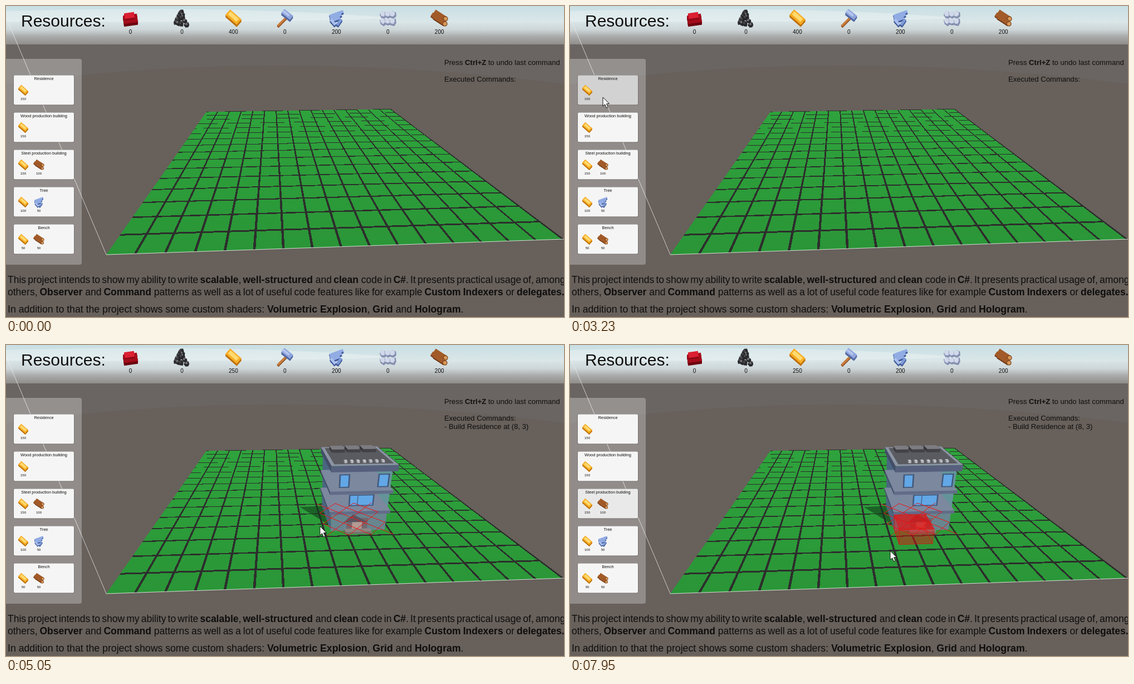
An HTML page with a canvas for the animation above (8000 ms loop, 1002 by 559 pixels).

```html
<!DOCTYPE html>
<html lang="en">
<head>
<meta charset="utf-8">
<title>Grid builder</title>
<style>
  html, body { margin: 0; width: 100%; height: 100%; overflow: hidden; background: #67605b; }
  canvas { display: block; }
</style>
</head>
<body>
<canvas id="stage" width="1002" height="559"></canvas>
<script>
const W = 1002, H = 559, LOOP = 8000, CELLS = 16, FILL = .91;
const FONT = '"Liberation Sans", Arial, sans-serif';
const stage = document.getElementById('stage').getContext('2d');
const backdrop = document.createElement('canvas');
backdrop.width = W;
backdrop.height = H;
let ctx = backdrop.getContext('2d');

const random = n => Math.abs(Math.sin(n * 12.9898) * 43758.5453) % 1;

// Ground cell (i, j) and height h, where 1 is the residence wall, to screen.
function project(i, j, h = 0) {
  const u = i / CELLS, v = j / CELLS;
  const w = 1 + .0653 * u + 1.5447 * v - .1455 * h;
  return [(180 + 887.4 * u + 736.1 * v - 80 * h) / w, (447 - .6 * u + 36.5 * v - 186 * h) / w];
}

// Screen to ground cell.
function toCell(x, y) {
  const a = 887.4 - .0653 * x, b = 736.1 - 1.5447 * x, p = x - 180;
  const c = -.6 - .0653 * y, d = 36.5 - 1.5447 * y, q = y - 447;
  const det = a * d - b * c;
  return [(p * d - b * q) / det * CELLS, (a * q - p * c) / det * CELLS];
}

const onGround = cell => cell.every(c => c >= 0 && c < CELLS);

function trace(points) {
  ctx.beginPath();
  points.forEach(p => ctx.lineTo(p[0], p[1]));
}

function poly(points, fill, stroke) {
  trace(points);
  ctx.closePath();
  if (fill) { ctx.fillStyle = fill; ctx.fill(); }
  if (stroke) { ctx.strokeStyle = stroke; ctx.lineWidth = 1; ctx.stroke(); }
}

function line(a, b, color) {
  trace([a, b]);
  ctx.strokeStyle = color;
  ctx.lineWidth = 1;
  ctx.stroke();
}

function roundRect(x, y, w, h, r, fill) {
  ctx.beginPath();
  ctx.roundRect(x, y, w, h, r);
  ctx.fillStyle = fill;
  ctx.fill();
}

function text(str, x, y, size, align = 'left', bold = false) {
  ctx.font = `${bold ? 'bold ' : ''}${size}px ${FONT}`;
  ctx.textAlign = align;
  ctx.fillStyle = '#0f0e0d';
  ctx.fillText(str, x, y);
  return ctx.measureText(str).width;
}

// Stars switch bold on and off; a right edge justifies the line.
function richText(str, x, y, size, right) {
  const parts = str.split('*');
  if (right) {
    const natural = parts.reduce((sum, part, k) => {
      ctx.font = `${k % 2 ? 'bold ' : ''}${size}px ${FONT}`;
      return sum + ctx.measureText(part).width;
    }, 0);
    ctx.wordSpacing = (right - x - natural) / (str.split(' ').length - 1) + 'px';
  }
  parts.forEach((part, k) => { x += text(part, x, y, size, 'left', k % 2 === 1); });
  ctx.wordSpacing = '0px';
}

// A bar turned by some degrees, with its thickness below it.
function bar(x, y, length, width, depth, degrees, top, side) {
  const angle = degrees * Math.PI / 180;
  const along = [Math.cos(angle) * length / 2, Math.sin(angle) * length / 2];
  const across = [-Math.sin(angle) * width / 2, Math.cos(angle) * width / 2];
  const corners = [[1, 1], [1, -1], [-1, -1], [-1, 1]]
    .map(([a, b]) => [x + a * along[0] + b * across[0], y + a * along[1] + b * across[1]]);
  for (let d = depth; d >= 0; d--) poly(corners.map(p => [p[0], p[1] + d]), d ? side : top);
}

function disc(x, y, r, fill) {
  ctx.beginPath();
  ctx.arc(x, y, r, 0, 2 * Math.PI);
  ctx.fillStyle = fill;
  ctx.fill();
}

function rock(x, y, r, seed, fill) {
  const corner = k => {
    const angle = k * Math.PI / 3 + random(seed), reach = r * (.75 + .4 * random(seed + k));
    return [x + reach * Math.cos(angle), y + reach * Math.sin(angle)];
  };
  poly([0, 1, 2, 3, 4, 5].map(corner), fill);
}

const ICONS = {
  ruby() {
    bar(0, 1, 25, 15, 5, -8, '#a50c1b', '#6d0510');
    bar(-2, -5, 18, 10, 3, -8, '#dc1f32', '#8d0916');
  },
  coal() {
    for (let k = 0; k < 14; k++) {
      const y = -11 + 1.8 * k, spread = 4 + .6 * k;
      const x = (random(k + 3) - .5) * 2 * spread - 1;
      rock(x, y, 5.5, k, '#28282b');
      rock(x - 1, y - 2, 2.4, k + 5, k % 2 ? '#707075' : '#47474b');
    }
  },
  gold() {
    bar(0, -2, 27, 13, 4, 41, '#f7ad25', '#bd7009');
    bar(0, -3, 20, 7, 0, 41, '#ffda70');
  },
  hammer() {
    bar(-4, 5, 25, 4, 2, -45, '#c87d3c', '#8a4a1c');
    bar(4, -7, 20, 9, 4, 38, '#8fa5dc', '#5369a0');
    bar(2, -9, 14, 4, 0, 38, '#b6c6ee');
  },
  steel() {
    for (let k = 0; k < 3; k++) bar(-k, -8 + 5 * k, 26 - 4 * k, 5, 3, -20, '#92ace4', '#3b5695');
    bar(-6, 7, 13, 5, 3, 50, '#a9bfee', '#3b5695');
    bar(5, 7, 13, 5, 3, -55, '#7f9bd8', '#3b5695');
  },
  stone() {
    for (let k = 0; k < 6; k++) {
      const x = -8 + 8.5 * (k % 3), y = k < 3 ? -7 : 6;
      rock(x, y + 1, 7.5, k + 2, '#8690b0');
      rock(x - 1, y - 1, 5.5, k + 2, '#d0d8ea');
    }
  },
  wood() {
    for (const [x, y] of [[2, -5], [-3, 0], [1, 4]]) {
      bar(x - 1, y - 1, 23, 8, 2, 33, '#a25b28', '#662f10');
      disc(x + 9, y + 6, 4.5, '#7a3e17');
      disc(x + 9, y + 6, 3.3, '#d6995a');
    }
  }
};

function icon(name, x, y, scale = 1) {
  ctx.save();
  ctx.translate(x, y);
  ctx.scale(scale, scale);
  ICONS[name]();
  ctx.restore();
}

const BUTTONS = [
  ['Residence', ['gold', 150]],
  ['Wood production building', ['gold', 150]],
  ['Steel production building', ['gold', 150], ['wood', 100]],
  ['Tree', ['gold', 100], ['steel', 50]],
  ['Bench', ['gold', 50], ['wood', 50]]
];
const RESOURCES = { ruby: 0, coal: 0, gold: 400, hammer: 0, steel: 200, stone: 0, wood: 200 };
const buttonTop = k => 124 + 67.1 * k;
const resourceX = k => 223.5 + 92.45 * k;

// Point sampling leaves the far lines broken.
function paintGround() {
  const image = ctx.getImageData(0, 0, W, H);
  for (let y = 184; y < 449; y++) {
    const k = (y - 184) / 264;
    for (let x = 178; x < W; x++) {
      const cell = toCell(x + .5, y + .5);
      if (!onGround(cell)) continue;
      const dark = cell.some(c => c % 1 > FILL);
      image.data.set(dark ? [45, 46, 44, 255] : [46 - 4 * k, 163 - 14 * k, 60 - 5 * k, 255], (y * W + x) * 4);
    }
  }
  ctx.putImageData(image, 0, 0);
}

function paintHeader() {
  const sky = ctx.createLinearGradient(0, 0, 0, 69);
  sky.addColorStop(0, '#c8dfe4');
  sky.addColorStop(.4, '#dae6e8');
  sky.addColorStop(.62, '#cdd5d7');
  sky.addColorStop(.8, '#a9aaaa');
  sky.addColorStop(1, '#918e8b');
  ctx.fillStyle = sky;
  ctx.fillRect(0, 0, W, 69);
  ctx.fillStyle = 'rgba(240,246,246,.4)';
  ctx.beginPath();
  ctx.moveTo(0, 9);
  ctx.quadraticCurveTo(420, -2, 700, 22);
  ctx.quadraticCurveTo(500, 30, 0, 28);
  ctx.fill();
}

function paintBackdrop() {
  ctx.fillStyle = '#6a6562';
  ctx.fillRect(0, 0, W, H);
  ctx.fillStyle = '#67605b';
  ctx.beginPath();
  ctx.moveTo(0, 140);
  ctx.quadraticCurveTo(480, 74, W, 140);
  ctx.lineTo(W, H);
  ctx.lineTo(0, H);
  ctx.fill();
  paintGround();
  paintHeader();
  line([0, 20], [180, 447], 'rgba(235,235,235,.75)');
  line([180, 447], [W, 419], 'rgba(235,240,235,.85)');
  roundRect(-4, 95, 140, 370, 4, 'rgba(255,255,255,.28)');

  text('Resources:', 27, 37, 30);
  Object.keys(RESOURCES).forEach((name, k) => icon(name, resourceX(k), 22));
  richText('Press *Ctrl+Z* to undo last command', 787, 106, 13.1);
  text('Executed Commands:', 787, 136, 13.1);
  richText('This project intends to show my ability to write *scalable*, *well-structured* and *clean* code in *C#*. ' +
    'It presents practical usage of, among', 3, 498, 17.5, 1001);
  richText('others, *Observer* and *Command* patterns as well as a lot of useful code features like for example ' +
    '*Custom Indexers* or *delegates.*', 3, 520, 17.5, 1000);
  richText('In addition to that the project shows some custom shaders: ' +
    '*Volumetric Explosion*, *Grid* and *Hologram*.', 3, 551, 17.7);
}

// A box on the ground; the camera sees its front, left side and top.
function box([i0, i1], [j0, j1], [h0, h1], front, left, top, stroke) {
  const quad = (fill, ...corners) => fill && poly(corners.map(c => project(...c)), fill, stroke);
  quad(left, [i0, j0, h0], [i0, j1, h0], [i0, j1, h1], [i0, j0, h1]);
  quad(front, [i0, j0, h0], [i1, j0, h0], [i1, j0, h1], [i0, j0, h1]);
  quad(top, [i0, j0, h1], [i1, j0, h1], [i1, j1, h1], [i0, j1, h1]);
}

const WALL = [[.24, 2.74], [.36, 2.76]], LEDGE = [[.14, 2.84], [.26, 2.76]], ROOF = [[.15, 2.9], [.2, 2.8]];
const STEPS = [[.85, 2.05], [.08, .36]];
const FLOORS = [0, .32, .64];

// Binds box() to a building standing at cell (i, j).
const blockAt = (i, j) => ([is, js], hs, ...colors) => box(is.map(a => a + i), js.map(b => b + j), hs, ...colors);

function shadow(i, j, fill) {
  poly([project(i - .95, j + 2.7), project(i + .24, j + 2.76), project(i + .24, j + .9)], fill);
}

function residence(i, j) {
  const block = blockAt(i, j);
  const pane = (a, b, h0, h1, fill) => block([[a, b], [.34, .34]], [h0, h1], fill);
  const glass = (a, b, h0, h1) => {
    pane(a, b, h0, h1, '#40587a');
    pane(a + .06, b - .06, h0 + .015, h1 - .015, '#62a7e6');
  };
  shadow(i, j, 'rgba(15,60,25,.6)');
  for (const h of FLOORS) {
    block(WALL, [h, h + .32], h ? '#64949a' : '#67868f', '#4a6680');
    if (h) block(LEDGE, [h - .02, h + .03], '#626c88', '#47516d', '#7c889e');
  }
  glass(.52, .97, .71, .91);
  glass(2.15, 2.64, .71, .91);
  glass(.98, 2.08, .42, .6);
  pane(1.35, 1.38, .43, .59, '#40587a');

  pane(.95, 1.9, 0, .22, '#74676d');
  pane(1.2, 1.65, .02, .18, '#b39a92');
  poly([project(i + .8, j + .3, .16), project(i + 1.2, j + .3, .29), project(i + 1.9, j + .3, .16)], '#5a5560');
  block(STEPS, [0, .035], '#77706f', '#5c5658', '#8d8583');

  block(ROOF, [.96, 1.05], '#56607d', '#434d68', '#8b94a3');
  block([[.3, 2.76], [.38, 2.66]], [1.05, 1.05], null, null, '#5a5b60');
  for (let k = 0; k < 3; k++) {
    block([[.5 + .72 * k, 1.1 + .72 * k], [1.9, 2.5]], [1.05, 1.1], '#434347', '#38383c', '#7c7c81');
  }
  for (let a = .75; a < 2.4; a += .26) {
    block([[a, a + .11], [.5, .65]], [1.05, 1.08], '#b8bcc2', '#80848c', '#cdd0d4');
  }

  for (let a = i; a < i + 3; a++) {
    for (let b = j; b < j + 3; b++) {
      line(project(a, b), project(a + 1, b + 1), '#f01414');
      line(project(a + 1, b), project(a, b + 1), '#f01414');
    }
  }
}

function residenceGhost(i, j) {
  const block = blockAt(i, j), glow = a => `rgba(10,255,35,${a})`;
  shadow(i, j, 'rgba(15,80,25,.45)');
  block(WALL, [0, .96], glow(.2), glow(.22), null, glow(.5));
  for (const h of FLOORS) {
    block(LEDGE, [h, h + .05], glow(.25), glow(.25), glow(.12), glow(.55));
    line(project(i + 2.74, j + .36, h + .3), project(i + 2.74, j + 2.76, h + .3), glow(.6));
  }
  block([[1.1, 1.9], [.3, .36]], [0, .2], glow(.25), null, null, glow(.4));
  block([[.95, 2.05], [.3, .34]], [.2, .25], glow(.6));
  block(STEPS, [0, .04], glow(.5), glow(.5), glow(.3), glow(.6));
  block(ROOF, [.98, 1.05], glow(.7), glow(.6), glow(.88), glow(.8));
}

function workshopGhost(i, j) {
  const blocked = i < SITE[0] + 3 && i + 2 > SITE[0] && j < SITE[1] + 3 && j + 2 > SITE[1];
  const tint = a => `rgba(${blocked ? '225,18,18' : '10,250,30'},${a})`;
  const is = [i + .24, i + 1.68], js = [j + .35, j + 1.58];
  box(is, js, [0, 0], null, null, tint(.15), tint(.35));
  box(is, js, [0, .24], tint(.38), tint(.45), tint(.75), tint(.5));
  line(project(is[1], js[1], .24), project(is[1], js[1]), tint(.6));
  line(project(is[1], js[1]), project(is[1], js[0]), tint(.6));
}

function pointer(x, y) {
  const outline = [[0, 0], [0, 16], [3.7, 12.8], [6.4, 19], [9.2, 17.8], [6.6, 11.8], [11.6, 11.6]];
  poly(outline.map(p => [x + p[0], y + p[1]]), '#fff', '#111');
}

// Key points of the pointer: time, x, y; a lone time is a rest until then.
const PATH = [
  [110, 864, 526], [870, 600, 346], [1220, 699, 377], [1630, 618, 297], [1810],
  [2250, 270, 424], [2480, 440, 182], [2650, 445, 290], [3160, 59, 164], [3300],
  [3540, 355, 298], [3680, 450, 308], [4470], [4540, 501, 324], [4750, 578, 329], [4980],
  [5700, 60, 215], [5840, 70, 172], [6030], [6090, 94, 187], [6500, 45, 285], [6850, 62, 290],
  [7180, 685, 345], [7690, 532, 339], [7950, 575, 370]
];
const SITE = [8, 3], BUILD_TIME = 5050, PRESS_LENGTH = 170;
const TOOLS = [
  { button: 0, press: 3160, end: BUILD_TIME, ghost: residenceGhost },
  { button: 2, press: 6560, end: LOOP, ghost: workshopGhost }
];

function pointerAt(t) {
  if (t < PATH[0][0]) return null;
  let [t0, x, y] = PATH[0];
  for (const [t1, x1 = x, y1 = y] of PATH) {
    if (t < t1) {
      const p = (t - t0) / (t1 - t0), eased = p * p * (3 - 2 * p);
      return [x + (x1 - x) * eased, y + (y1 - y) * eased];
    }
    [t0, x, y] = [t1, x1, y1];
  }
  return [x, y];
}

function buttonShade(k, at, tool, pressed) {
  if (tool && tool.button === k) return pressed ? '#d2d2d2' : '#e9e9e9';
  const top = buttonTop(k);
  const hovered = at && at[0] > 14 && at[0] < 122 && at[1] > top - 4 && at[1] < top + 53;
  return hovered ? '#e9e9e9' : '#f5f5f5';
}

function paintButtons(at, tool, pressed) {
  BUTTONS.forEach(([label, ...costs], k) => {
    const top = Math.round(buttonTop(k));
    roundRect(13.5, top + .3, 109, 54, 2.5, 'rgba(70,66,63,.6)');
    roundRect(14, top + .5, 108, 53, 2, buttonShade(k, at, tool, pressed));
    text(label, 68, top + 9.2, 7.45, 'center');
    costs.forEach(([name, amount], n) => {
      icon(name, 31 + 28 * n, top + 27.5, .62);
      text(amount, 31 + 28 * n, top + 44.5, 6, 'center');
    });
  });
}

function paintHover(cell) {
  const [i, j] = cell.map(Math.floor);
  box([i, i + FILL], [j, j + FILL], [0, 0], null, null, '#45fa25');
}

function paint(t) {
  const at = pointerAt(t), built = t >= BUILD_TIME;
  const tool = TOOLS.find(o => t >= o.press && t < o.end);
  const pressed = tool && t < tool.press + PRESS_LENGTH;
  ctx.drawImage(backdrop, 0, 0);
  Object.values(RESOURCES).forEach((amount, k) => {
    text(built && k === 2 ? amount - 150 : amount, resourceX(k), 50, 10, 'center');
  });
  paintButtons(at, tool, pressed);
  if (built) {
    text(`- Build Residence at (${SITE.join(', ')})`, 787, 151, 13.1);
    residence(...SITE);
  }
  if (!at) return;
  const cell = toCell(...at);
  if (onGround(cell)) {
    if (tool) tool.ghost(Math.round(cell[0]), Math.floor(cell[1] + .15));
    else if (!built) paintHover(cell);
  }
  pointer(...at);
}

paintBackdrop();
ctx = stage;
const begin = performance.now();
function tick() {
  paint((performance.now() - begin) % LOOP);
  requestAnimationFrame(tick);
}
tick();
</script>
</body>
</html>
```
